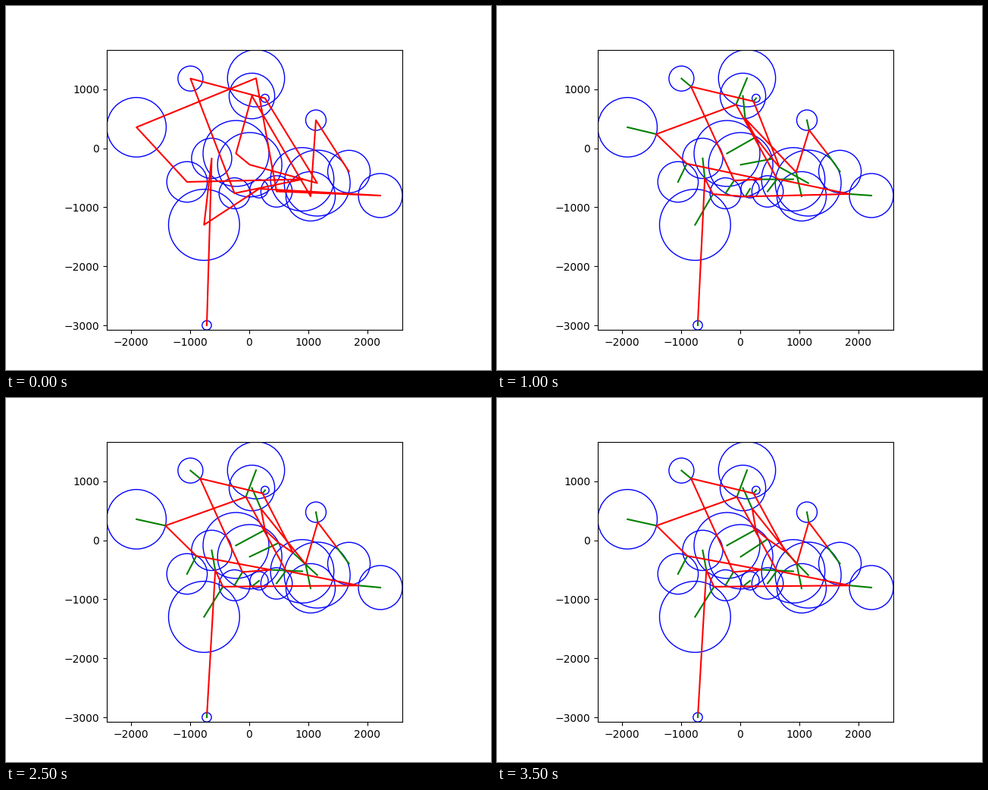
Recreate the animation shown at these times as a matplotlib script. Size 640 by 480 pixels, loop 4 s.

```python
import numpy as np
import matplotlib.pyplot as plt
from matplotlib.animation import FuncAnimation
from matplotlib.collections import LineCollection

STEPS = 8
RELAX = 0.7      # share of the way to the best angle, after the first step
BIAS = 1.001     # of two equal touch points, prefer the one met first

# Circles in tour order: centre x, centre y, radius.
CIRCLES = np.array([
    (-720, -3000, 79), (-637, -172, 341), (-766, -1298, 602),
    (167, -687, 155), (2223, -802, 373), (463, -732, 266),
    (115, 1185, 484), (-1912, 355, 504), (-1055, -571, 343),
    (898, -527, 537), (-250, -764, 262), (-997, 1180, 212),
    (268, 846, 68), (1152, -591, 558), (8, -280, 545),
    (-225, -89, 558), (45, 885, 386), (1040, -815, 418),
    (1130, 475, 173), (1690, -396, 360),
], float)
centers, radii = CIRCLES[:, :2], CIRCLES[:, 2]
sweep = np.linspace(0, 2 * np.pi, 3600, endpoint=False)


def on_circle(center, r, angle):
    direction = np.stack([np.cos(angle), np.sin(angle)], axis=-1)
    return center + np.expand_dims(r, -1) * direction


def best_angle(i, points):
    """Angle on circle i giving the shortest way between its neighbours."""
    rim = on_circle(centers[i], radii[i], sweep)
    length = np.zeros(len(sweep))
    if i > 0:
        length += BIAS * np.linalg.norm(rim - points[i - 1], axis=1)
    if i < len(points) - 1:
        length += np.linalg.norm(rim - points[i + 1], axis=1)
    return sweep[length.argmin()]


def shorten():
    """Paths of all steps; every point moves at once in each step."""
    paths = [centers]
    angles = None
    while len(paths) < STEPS:
        best = np.array([best_angle(i, paths[-1]) for i in range(len(radii))])
        if angles is None:
            angles = best
        else:
            turn = (best - angles + np.pi) % (2 * np.pi) - np.pi
            angles = angles + RELAX * turn
        paths.append(on_circle(centers, radii, angles))
    return paths


paths = shorten()

fig, ax = plt.subplots(figsize=(6.4, 4.8), dpi=100)
for center, r in zip(centers, radii):
    ax.add_patch(plt.Circle(center, r, fill=False, color="blue"))

low = (centers - radii[:, None]).min(axis=0)
high = (centers + radii[:, None]).max(axis=0)
ax.set_xlim(low[0], high[0])
ax.set_ylim(low[1], high[1])
ax.set_aspect("equal", adjustable="box")

spokes = LineCollection([], colors="green", linewidths=1.5,
                        capstyle="projecting", zorder=2)
ax.add_collection(spokes, autolim=False)
path, = ax.plot([], [], color="red", lw=1.5, zorder=3,
                scalex=False, scaley=False)


def draw(step):
    points = paths[step]
    path.set_data(points[:, 0], points[:, 1])
    spokes.set_segments(np.stack([centers, points], axis=1) if step else [])
    return path, spokes


anim = FuncAnimation(fig, draw, frames=STEPS, init_func=lambda: draw(0),
                     interval=500, repeat=True, repeat_delay=0)
plt.show()
```
